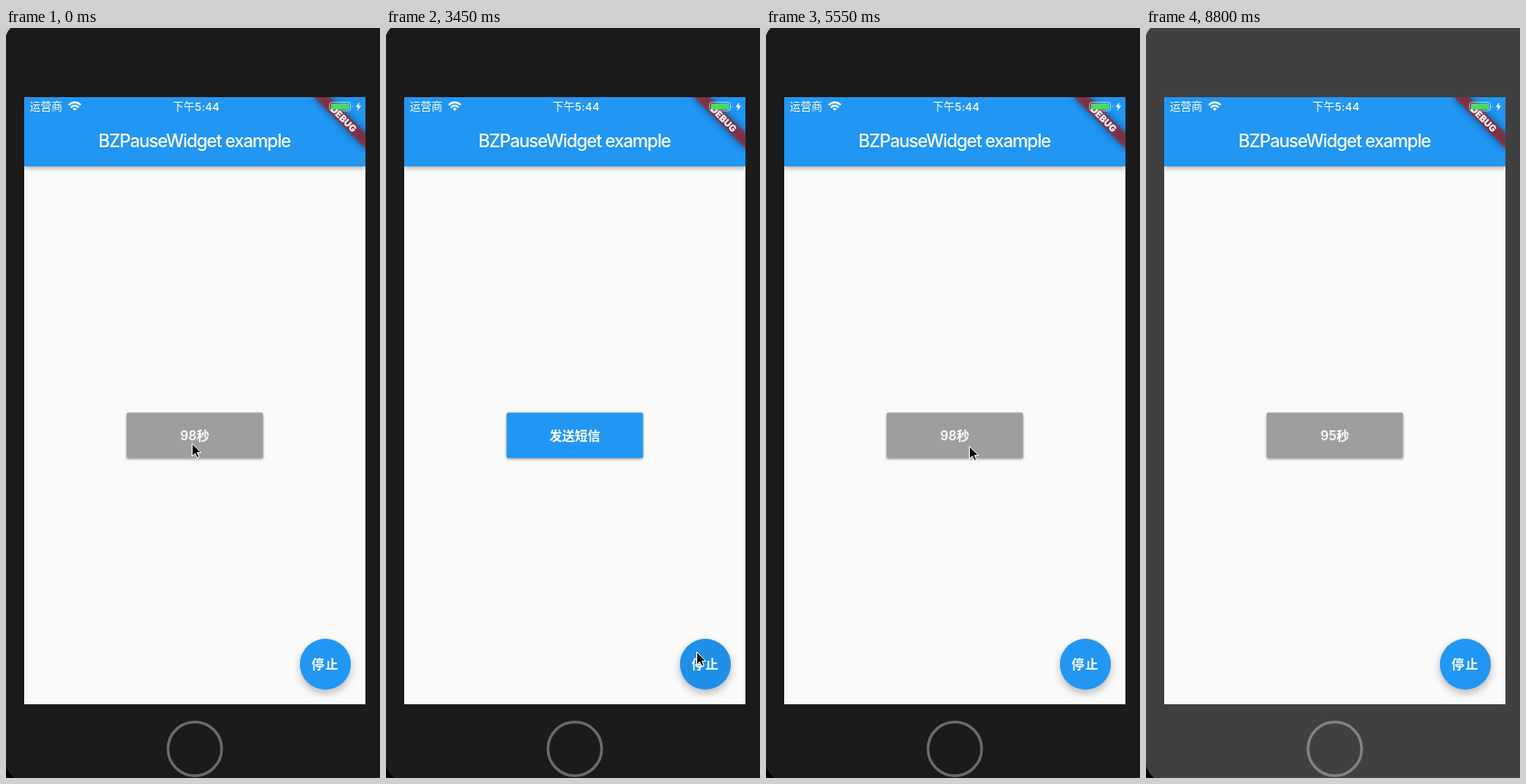
Recreate the animation shown at these times as an HTML page. Size 411 by 824 pixels, loop 8900 ms.

```html
<!DOCTYPE html>
<html lang="zh-CN">
<head>
<meta charset="utf-8">
<title>Countdown button</title>
<style>
html, body { margin: 0; width: 100%; height: 100%; overflow: hidden; }
body { position: relative; background: #1b1b1b; font-family: Inter, "Noto Sans CJK SC", "Noto Sans CJK", sans-serif; color: #fff; }
body.lit { background: #404040; }
div, svg { position: absolute; }
svg { left: 0; top: 0; overflow: visible; }
#home { fill: none; stroke: #6b6b6b; stroke-width: 3; }
.lit #home { stroke: #828282; }
#screen { left: 20px; top: 76px; width: 375px; height: 667px; overflow: hidden; background: #fafafa; }
#bar { left: 0; top: 0; width: 375px; height: 76px; background: #2196f3; box-shadow: 0 2px 5px #0005; }
#title { left: 0; top: 34px; width: 374px; text-align: center; font: 500 19.5px/28px Inter, sans-serif; letter-spacing: -1px; white-space: nowrap; }
#btn, #fab { text-align: center; font-weight: 600; font-size: 14px; white-space: nowrap; }
#btn { left: 112px; top: 346px; width: 150px; height: 50px; line-height: 50px; border-radius: 2px;
  transform: translate(.5px, .5px); box-shadow: 0 1.5px 3px #0005; }
#btn.up { box-shadow: 0 4px 6px #0005; }
#fab { left: 303px; top: 595px; width: 56px; height: 56px; line-height: 56px; border-radius: 50%; letter-spacing: 1.2px;
  box-shadow: 0 4px 8px #0004; }
</style>
</head>
<body>
<svg width="411" height="824">
  <path d="M0 0H5Q2 3 0 8Z" fill="#c8c8c8"/>
  <path d="M0 811Q3 819 9 824H0Z" fill="#000"/>
  <circle id="home" cx="207.5" cy="792" r="29.5"/>
</svg>
<div id="screen">
  <div id="bar"><div id="title">BZPauseWidget example</div></div>
  <div id="btn"></div>
  <div id="fab">停止</div>
  <svg width="375" height="667" fill="#fff">
    <g transform="translate(375 0) rotate(45)">
      <rect x="-40" y="28" width="80" height="12" fill="#000" opacity=".5" style="filter:blur(4px)"/>
      <rect x="-40" y="28" width="80" height="12" fill="#b71c1c" fill-opacity=".627"/>
      <text x="0" y="37.7" text-anchor="middle" font-size="10.2" font-weight="900">DEBUG</text>
    </g>
    <text x="6" y="14.5" font-size="12">运营商</text>
    <text x="189" y="14.5" font-size="12" font-weight="500" letter-spacing=".2" text-anchor="middle">下午5:44</text>
    <g fill="none" stroke="#fff" stroke-width="2">
      <path d="M48.8 8.6Q55.5 2.6 62.2 8.6M51.2 11.2Q55.5 7.4 59.8 11.2"/>
      <path d="M53.2 12.8Q55.5 10.9 57.8 12.8L55.5 15.2Z" fill="#fff" stroke="none"/>
    </g>
    <rect x="335.5" y="5.5" width="23" height="9.5" rx="2.5" fill="none" stroke="#fff" stroke-opacity=".55"/>
    <rect x="337" y="7" width="20" height="6.5" rx="1.2" fill="#4cd964"/>
    <path d="M360 8.5q1.6 1.7 0 3.4z" fill-opacity=".55"/>
    <path d="M368.2 5.5L364.3 10.8H366.9L366 15L370.3 9.4H367.6Z"/>
  </svg>
</div>
<svg id="cursor" width="12" height="18">
  <path d="M.5 .5V14.5L3.8 11.5L6 16.3L8.3 15.3L6.2 10.6H10.4Z" fill="#000" stroke="#fff" stroke-linejoin="round"/>
</svg>
<script>
const LOOP = 8900, STEP = 150;
const BLUE = '#2196f3', PRESSED = '#208fe8', GREY = '#9e9e9e';
const $ = id => document.getElementById(id);
const btn = $('btn'), fab = $('fab'), cursor = $('cursor');

const linear = p => p;
const easeIn = p => p ** 3;
const easeOut = p => 1 - (1 - p) ** 3;
const smooth = p => p * p * (3 - 2 * p);

// pointer moves: begin, end, target x, target y, easing
const home = [204, 456];
const moves = [
  [0, 450, 227, 549, linear],
  [900, 1800, 273, 578, linear],
  [2100, 3000, 341, 685, easeOut],
  [3450, 4200, 223, 459, smooth],
  [5700, 6450, 313, 764, smooth],
  [6600, 7050, 358, 815, smooth],
  [7350, 7650, 390, 855, easeIn]
];

function pointer(t) {
  let [x, y] = home;
  for (const [begin, end, toX, toY, ease] of moves) {
    const p = ease(Math.min(1, Math.max(0, (t - begin) / (end - begin))));
    x += (toX - x) * p;
    y += (toY - y) * p;
  }
  return [Math.round(x), Math.round(y)];
}

// the first countdown is already running when the loop begins
const FIRST = -1600, STOP = 3450, PRESS = 4350, SECOND = 4450;
const seconds = t => 99 - Math.floor((t - (t < STOP ? FIRST : SECOND)) / 1000) + '秒';

function draw(time) {
  const t = Math.floor(time / STEP) * STEP;
  const [x, y] = pointer(t);
  cursor.style.transform = `translate(${x}px, ${y}px)`;

  const idle = t >= STOP && t < SECOND;
  const label = idle ? '发送短信' : seconds(t);
  if (btn.textContent !== label) btn.textContent = label;
  btn.style.background = !idle ? GREY : t < PRESS ? BLUE : PRESSED;
  btn.classList.toggle('up', t > PRESS && t <= PRESS + STEP);

  fab.style.background = Math.abs(t - STOP) <= STEP ? PRESSED : BLUE;
  document.body.classList.toggle('lit', time >= 8800);
}

const start = performance.now();
function tick() {
  draw((performance.now() - start) % LOOP);
  requestAnimationFrame(tick);
}
tick();
</script>
</body>
</html>
```
